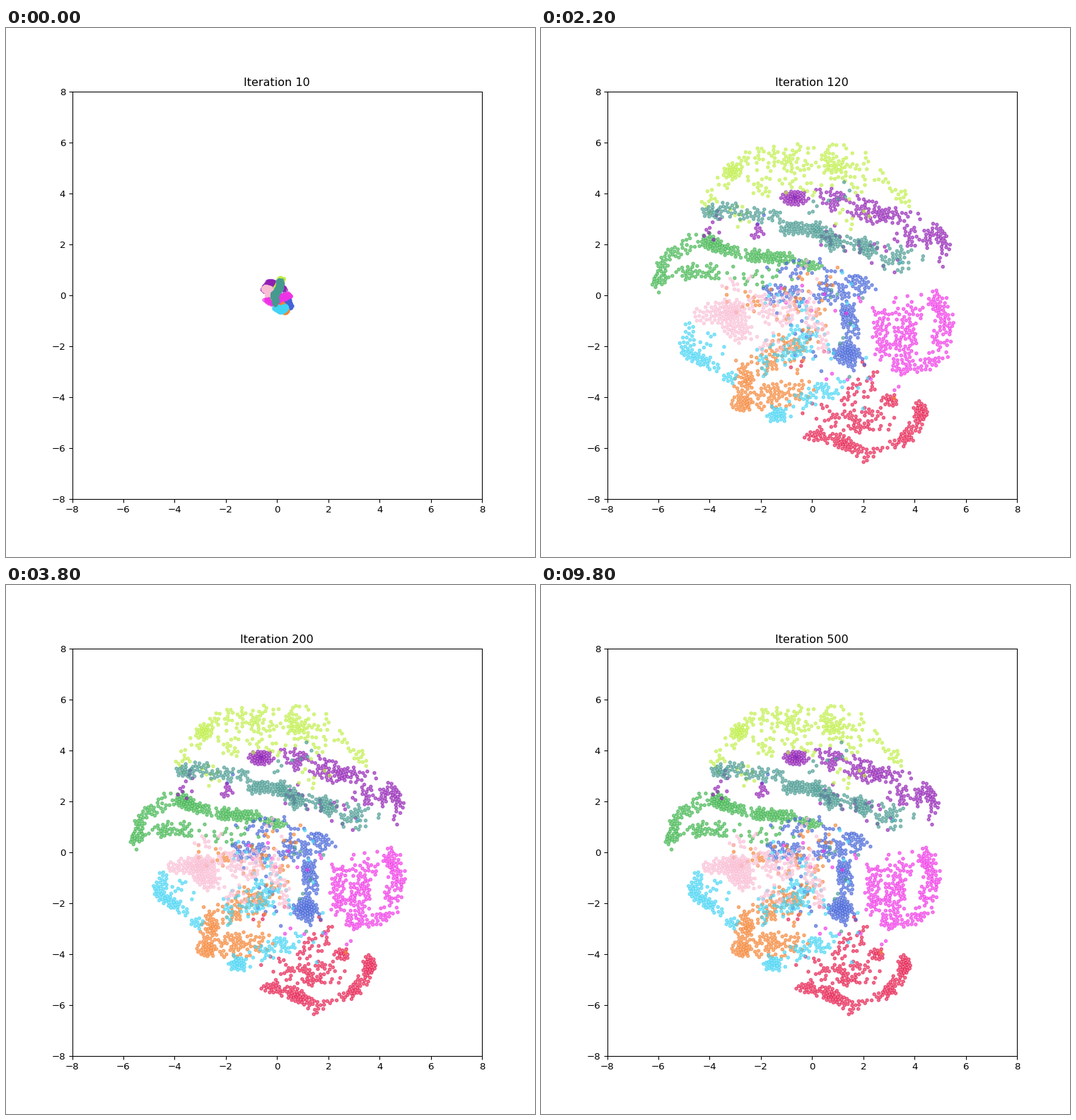
Recreate the animation shown at these times as a matplotlib script. Size 748 by 748 pixels, loop 10000 ms.

```python
import numpy as np
import matplotlib.pyplot as plt
from matplotlib.animation import FuncAnimation

SIZE, DPI = 748, 96
STEPS, INTERVAL = 50, 200

rng = np.random.default_rng(7)
colors, early, middle, late = [], [], [], []


def along(path, t):
    """Points at the fractions t of a polyline's length."""
    p = np.asarray(path, float)
    d = np.r_[0, np.cumsum(np.hypot(*np.diff(p, axis=0).T))]
    s = t * d[-1]
    return np.c_[np.interp(s, d, p[:, 0]), np.interp(s, d, p[:, 1])]


def band(n, width, *path, power=1.0):
    """Random points within a given distance of a polyline."""
    base = along(path, rng.random(n) ** power)
    r = width * np.sqrt(rng.random(n))
    a = rng.random(n) * 2 * np.pi
    return base + np.c_[r * np.cos(a), r * np.sin(a)]


def relax(p, gap=0.14, rounds=10):
    """Push close neighbours apart for an even spread."""
    for _ in range(rounds):
        d = p[:, None] - p[None]
        r = np.hypot(d[..., 0], d[..., 1]) + 1e-6
        push = np.clip(gap - r, 0, None) / r * 0.2
        p = p + (d * push[..., None]).sum(axis=1)
    return p


def squeeze(p, spine):
    """Shrink a cluster and pull it toward its spine, leaving strays loose."""
    q = 0.445 * p
    s = along(spine, np.linspace(0, 1, 80))
    d = np.hypot(*(q[:, None] - s[None]).transpose(2, 0, 1))
    k = np.where(d.min(axis=1) < 0.5, rng.uniform(0.3, 0.85, len(p)), 0.1)
    return q + (s[d.argmin(axis=1)] - q) * k[:, None]


def cluster(color, seed, spine, *bands):
    p = relax(np.vstack([band(*b) for b in bands]))
    colors.extend([color] * len(p))
    early.append(band(len(p), 0.11, *seed, power=0.6))
    middle.append(squeeze(p, spine))
    late.append(p)


cluster("#e6194b", [(.1, -.4), (.35, -.5)],
        [(.7, -1.4), (.5, -2.2), (1, -2.6), (1.65, -2.5)],
        (65, .25, (-.5, -5.2), (.3, -5.4), (1.1, -5.8), (1.6, -6.1)),
        (26, .2, (1.4, -6.2), (2.4, -5.8), (3.2, -5.4)),
        (46, .22, (3, -5.5), (3.5, -4.8), (3.6, -4.1)),
        (68, .5, (-.2, -4.5), (1.2, -4.8), (2.4, -4.7)),
        (30, .5, (1, -4.2), (1.7, -3.2), (2, -2.8)),
        (16, .15, (2.3, -4), (2.8, -4)),
        (4, .4, (-1, -3), (2.6, -.2)))

cluster("#3cb44b", [(-.2, .1), (.1, .3)],
        [(-2.6, .7), (-1.9, .85), (-1.2, .75), (-.5, .6)],
        (45, .2, (-5.5, .2), (-5.3, 1.2), (-5, 1.75)),
        (30, .3, (-4.9, 1.5), (-4.3, 2.05), (-3.4, 2)),
        (85, .17, (-3.8, 2), (-3, 1.7), (-2, 1.5), (-.9, 1.4)),
        (30, .12, (-1.2, 1.4), (-.5, 1.35), (.3, 1)),
        (40, .3, (-4.8, .8), (-4.2, 1), (-3.4, .9)),
        (20, .4, (-3.3, 1.2), (-2, .7), (-.8, .6)))

cluster("#4363d8", [(.1, -.2), (.4, -.2), (.5, -.48)],
        [(-.8, .3), (.2, 0), (.7, .1), (.55, -.8)],
        (60, .25, (1.25, -.3), (1.35, -1.5), (1.2, -2.2)),
        (45, .35, (.9, -2.2), (1.5, -2.6)),
        (70, .45, (.3, 0), (1.2, .3), (2.3, .4)),
        (38, .4, (-1.6, 0), (-.9, .1), (-.2, -.1)),
        (25, .45, (-1.3, .8), (0, 1.2), (1.4, .8)),
        (15, .8, (-.9, -.9), (.5, -2.8)),
        (3, .5, (-2.5, 2.3), (0, 3.8)))

cluster("#f58231", [(0, -.2), (.35, -.62)],
        [(-1.1, -1.8), (-.9, -1.4), (-.3, -1.3)],
        (35, .35, (-2.6, -2.3), (-2.7, -3.3)),
        (28, .28, (-2.9, -3.7), (-2.6, -3.8)),
        (70, .6, (-2.3, -3.5), (-1.2, -3.6), (-.3, -3.2)),
        (70, .6, (-2, -2.3), (-1, -1.9), (-.2, -1.8)),
        (38, .7, (-2.6, .1), (0, -.5), (.5, -1)),
        (8, .4, (-.8, 1), (.9, .7)),
        (1, .1, (2.7, -3.9), (2.8, -3.9)))

cluster("#911eb4", [(.3, .15), (.1, .4), (-.3, .47), (-.48, .2)],
        [(-.4, 1.45), (.8, 1.3), (1.6, 1), (2.15, .95)],
        (38, .2, (-1, 3.65), (-.3, 3.7)),
        (58, .4, (.2, 3.75), (1.2, 3.55), (2.3, 3.1)),
        (45, .4, (2, 3.2), (2.8, 3.1), (3.5, 2.9)),
        (40, .4, (3.2, 2.2), (4, 2.2), (4.5, 2.1)),
        (24, .13, (4.3, 2.7), (4.8, 2.1), (4.6, 1.1)),
        (10, .5, (-3.7, 2.9), (-3.4, 1.9)),
        (10, .2, (-2, 2.3), (-1.9, 2.5)),
        (25, .5, (.2, 2.3), (2.2, 1.8), (2.8, .9)))

cluster("#42d4f4", [(-.05, -.48), (.15, -.6), (.32, -.5)],
        [(-2, -.7), (-1.6, -1), (-1.1, -1.5), (-.5, -1.95), (.2, -1.9), (.2, -1.3)],
        (28, .25, (-4.4, -.9), (-4.6, -1.6)),
        (40, .2, (-4.5, -1.7), (-3.9, -2.1), (-3, -2.9)),
        (9, .3, (-4.1, -1.3), (-3.1, -1.7)),
        (75, .65, (-1.9, -2.4), (-.8, -1.6), (.2, -2)),
        (26, .25, (-1.8, -4.3), (-1.2, -4.4)),
        (42, .45, (-.8, -4), (.2, -3.7), (.6, -3.3)),
        (18, .6, (-1.5, -.1), (0, -.8)),
        (9, .5, (2.9, 1), (1, .6), (2.2, -2.5), (1.5, -4)))

cluster("#f032e6", [(-.48, -.1), (-.2, -.3), (.2, -.1), (.47, -.02)],
        [(.9, -.3), (1.2, -.7), (1.6, -.95), (2.1, -.7), (2.2, -.3)],
        (48, .4, (2.35, -.6), (2.3, -2.2)),
        (72, .36, (4.2, .05), (4.6, -.3), (4.7, -1.2), (4.4, -2.2)),
        (66, .5, (3, -.7), (3.4, -1.6), (3, -2.4)),
        (40, .3, (2.7, -2.75), (3.7, -2.85), (4.3, -2.3)),
        (16, .35, (3.2, -.1), (3.9, -.9)),
        (10, .6, (-.8, 0), (1.6, -.5)),
        (6, .4, (-.5, -3), (3.2, -3.6)))

cluster("#bfef45", [(-.2, -.1), (.1, .4), (.17, .65)],
        [(-1.5, 1.8), (-1.1, 2.35), (-.3, 2.5), (.6, 2.62), (1.2, 2.2), (1.5, 1.5)],
        (28, .28, (-2.9, 4.7), (-2.7, 4.7)),
        (128, .62, (-2.3, 4.9), (-1, 5.15), (1, 5.3), (1.7, 4.95)),
        (45, .38, (-2.5, 4), (-.5, 4.3), (1.2, 4.2), (2.5, 4.2)),
        (20, .22, (2.3, 4.8), (3, 4), (3.6, 3.4)),
        (17, .28, (-3.9, 3.2), (-3.4, 4.1), (-3, 4.5)),
        (9, .4, (-2.8, 3.4), (-2.4, 2.4)),
        (11, .7, (.4, 3.5), (2, 2.6)))

cluster("#fabed4", [(-.35, 0), (-.3, .2), (-.47, .25)],
        [(-1.8, -.5), (-1, -.4), (-.3, -.4), (0, -1.1)],
        (62, .32, (-4.1, -.6), (-3.5, -.5), (-2.8, -.4)),
        (58, .45, (-3, -.7), (-2.5, -1.1)),
        (65, .55, (-2.3, -.3), (-1.3, -.6), (-.6, -.4)),
        (40, .35, (-.3, .1), (0, -1), (.4, -2)),
        (10, .3, (-3.1, .5), (-2.2, .4)),
        (15, .4, (-2, -1.5), (-.8, -1.8)),
        (4, .5, (-1.9, 1), (.5, 1)))

cluster("#469990", [(-.05, -.42), (-.1, 0), (.1, .25), (.13, .55)],
        [(-1.5, 1.55), (-1, 1.65), (0, 1.4), (1, 1.15), (2, .9)],
        (70, .28, (-3.7, 3.1), (-3, 3.3), (-2, 3), (-1.2, 2.9)),
        (72, .22, (-1.1, 2.6), (.2, 2.5), (.7, 2.2)),
        (60, .3, (.5, 2.1), (1.6, 1.9), (2.3, 1.7)),
        (36, .5, (2.4, 1.5), (3.2, 1.4), (3.8, 1.4)),
        (9, .3, (-.3, 3.3), (.4, 3.5), (1.8, 4.5)),
        (8, .4, (0, .5), (1.8, -.2), (.6, -3.8)))

tiny, packed, final = (np.vstack(p) for p in (early, middle, late))

# The widest pose: stretched sideways, with the lower half sheared.
x, y = final.T
low = np.clip(-y / 1.5, 0, 1)
wide = np.c_[1.09 * x + 0.07 * np.maximum(-y, 0),
             1.03 * y + 0.12 * low * np.minimum(x, 0)]
settled = np.c_[x + 0.015 * np.maximum(-y, 0), 0.985 * y]


def mix(a, b, k):
    return a + (b - a) * k


KEYS = [
    (10, tiny),
    (30, mix(tiny, packed, 0.36)),
    (50, mix(tiny, packed, 0.74)),
    (80, packed),
    (100, packed * 1.06),
    (110, mix(packed * 1.06, wide, 0.55)),
    (120, wide),
    (140, mix(wide, settled, 0.65)),
    (160, settled),
    (200, final),
]


def pose(it):
    for (a, p), (b, q) in zip(KEYS, KEYS[1:]):
        if it <= b:
            return mix(p, q, (it - a) / (b - a))
    return final


fig, ax = plt.subplots(figsize=(SIZE / DPI + 1e-9, SIZE / DPI + 1e-9), dpi=DPI)
ax.set(xlim=(-8, 8), ylim=(-8, 8))
dots = ax.scatter(*tiny.T, s=10, c=colors, alpha=0.6)
title = ax.set_title("Iteration 10")


def draw(i):
    it = 10 * (i + 1)
    dots.set_offsets(pose(it))
    title.set_text(f"Iteration {it}")
    return dots, title


anim = FuncAnimation(fig, draw, frames=STEPS, interval=INTERVAL,
                     repeat=True, repeat_delay=0, blit=False)
plt.show()
```
